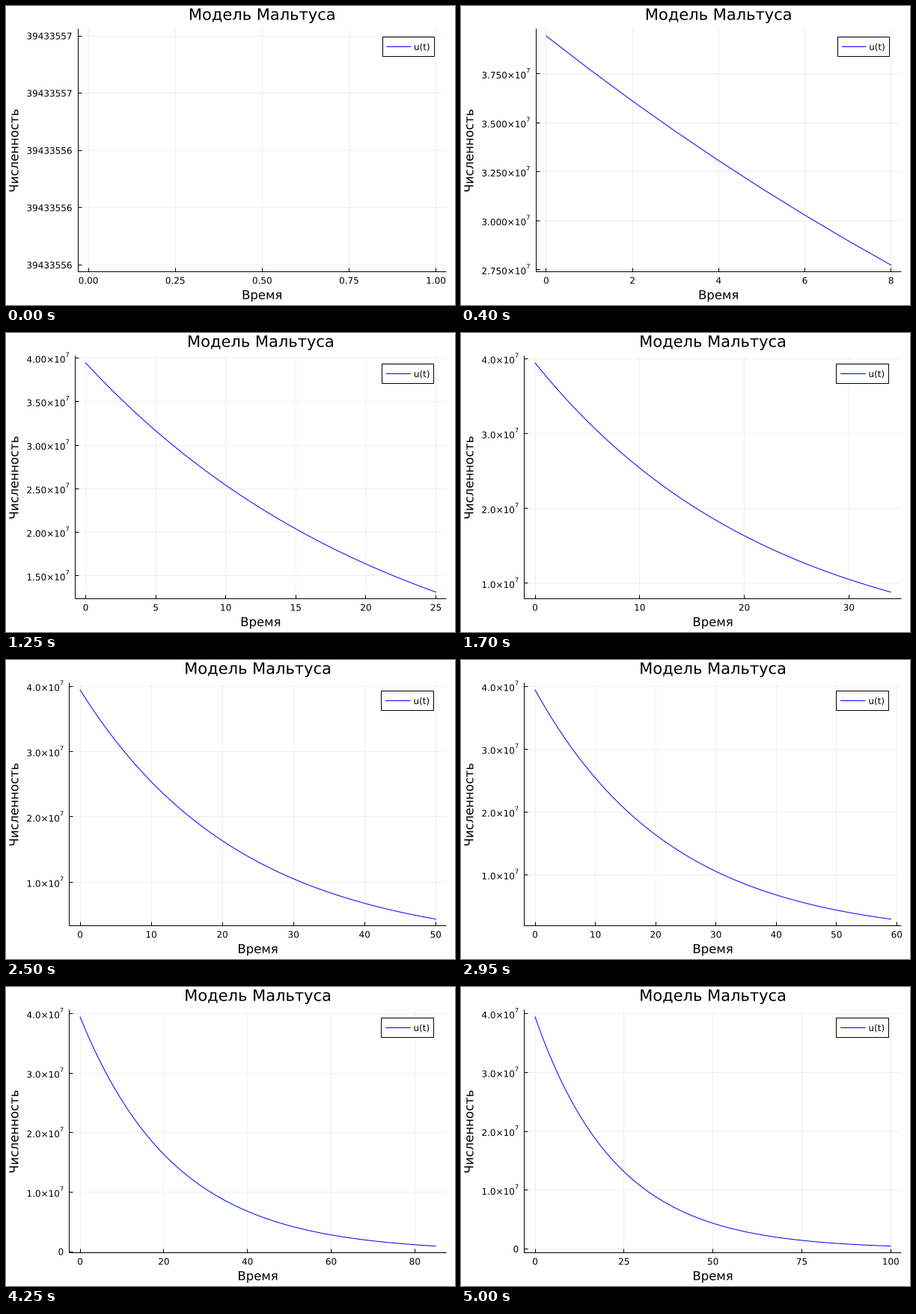
A matplotlib script for the animation above (5.05 s loop, 600 by 400 pixels).

```python
import math

import matplotlib.pyplot as plt
import numpy as np
from matplotlib.animation import FuncAnimation
from matplotlib.collections import LineCollection
from matplotlib.patches import PathPatch, Rectangle
from matplotlib.path import Path
from matplotlib.textpath import TextPath

plt.rcParams["font.family"] = "DejaVu Sans"

W, H, DPI = 600, 400, 100
PX = 72 / DPI
TOP, BOTTOM, RIGHT = 30.9, 355.8, 588.5
PAD = 0.03
N0, RATE, STEPS = 39433556, 0.044, 101
SMALL, SUP, LABEL, TITLE = 12, 8.4, 16.5, 21

# step mantissas and how nice they are
NICE = [(1, 1.0), (5, 0.9), (2, 0.7), (2.5, 0.5), (3, 0.2)]
K_MIN, K_MAX, K_IDEAL = 4, 8, 5


def find_ticks(lo, hi):
    """Score all round step sizes and return the best tick values."""
    span = hi - lo
    z = math.ceil(math.log10(span))
    best, ticks = -math.inf, []
    while 2 * K_MAX * 10.0 ** (z + 1) > span:
        for k in range(K_MIN, 2 * K_MAX + 1):
            for q, nice in NICE:
                step = q * 10.0 ** z
                first, last = math.ceil(lo / step), math.floor(hi / step)
                start, stop = last_start(hi, step, k), math.floor(lo / step)
                n = last - first + 1
                if not K_MIN <= n <= K_MAX or start > stop:
                    continue
                has_zero = start <= 0 and stop > -k
                score = (1 - abs(n - K_IDEAL) / K_IDEAL) / 4 + has_zero / 6
                score += 0.5 * span / ((n - 1) * step) + nice / 4
                if (k - 1) * step >= 2 * span:
                    score -= 1000
                if score > best + 1e-9:
                    best = score
                    ticks = [round(i * step, 6) for i in range(first, last + 1)]
        z -= 1
    return ticks


def last_start(hi, step, k):
    return math.ceil(hi / step) - k + 1


def decimals(values):
    for d in range(8):
        if all(abs(v - round(v, d)) < 1e-9 for v in values):
            return d
    return 8


def format_ticks(ticks):
    """Return (text, superscript) pairs."""
    if ticks[-1] - ticks[0] > 1e4:
        exps = [math.floor(math.log10(v) + 1e-9) if v else 0 for v in ticks]
        mants = [v / 10 ** e for v, e in zip(ticks, exps)]
        d = decimals(mants) + 1
        return [(f"{m:.{d}f}×10", str(e)) if m else ("0", "")
                for m, e in zip(mants, exps)]
    d = 0 if ticks[-1] > 1e7 else decimals(ticks)
    return [(f"{v:.{d}f}", "") for v in ticks]


def advance(s, size):
    return size * sum({".": 0.318, "×": 0.838}.get(c, 0.636) for c in s)


def padded(lo, hi):
    pad = PAD * (hi - lo)
    return lo - pad, hi + pad


def mid(v):
    return math.floor(v) + 0.5


outlines = {}


def text(x, y, s, size, centre=False, upright=False):
    """Outline of a string as (vertices, codes) in stage pixels."""
    if (s, size) not in outlines:
        path = TextPath((0, 0), s, size=size)
        outlines[s, size] = path.vertices, path.codes
    verts, codes = outlines[s, size]
    u, v = verts[:, 0], verts[:, 1]
    if centre:
        ink = u[codes != Path.CLOSEPOLY]
        u = u - (ink.min() + ink.max()) / 2
    if upright:
        return np.column_stack([x - v, y - u]), codes
    return np.column_stack([x + u, y - v]), codes


fig = plt.figure(figsize=(W / DPI, H / DPI), dpi=DPI, facecolor="white")
ax = fig.add_axes([0, 0, 1, 1])
ax.set_xlim(0, W)
ax.set_ylim(H, 0)
ax.axis("off")

grid = LineCollection([], colors="#efefef", linewidths=PX, zorder=1)
frame = LineCollection([], colors="black", linewidths=PX, zorder=2)
for lines in (grid, frame):
    lines.set_snap(False)
    ax.add_collection(lines, autolim=False)
curve, = ax.plot([], [], color="blue", lw=PX, zorder=3)
box = ax.add_patch(Rectangle((0, 41.5), 1, 26, fc="white", ec="black",
                             lw=PX, snap=False, zorder=4))
key, = ax.plot([], [], color="blue", lw=PX, snap=False,
               solid_capstyle="butt", zorder=5)
words = ax.add_patch(PathPatch(Path([(0, 0)]), fc="black", lw=0,
                               snap=False, zorder=6))
ax.set_xlim(0, W)
ax.set_ylim(H, 0)


def place_legend(left):
    """Set the legend box and line, return its text."""
    width = RIGHT - left
    f = width / 45
    right = RIGHT - width / 30
    x = right - 21.67 - f * 13 / 3
    box.set_x(mid(x))
    box.set_width(mid(right) - mid(x))
    key.set_data([x + f / 2, x + 3.5 * f], [54.5, 54.5])
    return text(x + f * 23 / 6, 58.9, "u(t)", SMALL)


def draw(n):
    t = np.arange(n + 1)
    u = N0 * np.exp(-RATE * t)
    xlim = padded(0, max(n, 1))
    ylim = padded(u[-1], u[0]) if n else padded(N0, N0 + 1)
    xt, yt = find_ticks(*xlim), find_ticks(*ylim)

    ylabels = format_ticks(yt)
    widths = [advance(s, SMALL) + advance(e, SUP) for s, e in ylabels]
    left = 35.05 + max(widths)
    ax_x, ax_y = mid(left), mid(BOTTOM)

    def sx(v):
        return left + (v - xlim[0]) / (xlim[1] - xlim[0]) * (RIGHT - left)

    def sy(v):
        return BOTTOM - (v - ylim[0]) / (ylim[1] - ylim[0]) * (BOTTOM - TOP)

    rules = []
    edges = [[(ax_x, TOP - 0.5), (ax_x, ax_y + 0.5)], [(ax_x, ax_y), (RIGHT, ax_y)]]
    centre = (left + RIGHT) / 2
    parts = [
        place_legend(left),
        text(centre, 18.6, "Модель Мальтуса", TITLE, centre=True),
        text(centre, 392.2, "Время", LABEL, centre=True),
        text(16.4, (TOP + BOTTOM) / 2, "Численность", LABEL, centre=True, upright=True),
    ]

    for v, (s, _) in zip(xt, format_ticks(xt)):
        x = mid(sx(v))
        rules.append([(x, TOP), (x, BOTTOM)])
        edges.append([(x, ax_y), (x, ax_y - 5)])
        parts.append(text(sx(v) - advance(s, SMALL) / 2, 371.5, s, SMALL))

    for v, (s, e), w in zip(yt, ylabels, widths):
        y = mid(sy(v))
        rules.append([(left, y), (RIGHT, y)])
        edges.append([(ax_x, y), (ax_x + 5, y)])
        x = left - 7.6 - w
        base = sy(v) + (6.1 if e else 4.4)
        parts.append(text(x, base, s, SMALL))
        if e:
            parts.append(text(x + advance(s, SMALL), base - 7.7, e, SUP))

    grid.set_segments(rules)
    frame.set_segments(edges)
    curve.set_data((sx(t), sy(u)) if n else ([], []))
    verts, codes = zip(*parts)
    words.set_path(Path(np.concatenate(verts), np.concatenate(codes)))
    return grid, frame, curve, box, key, words


anim = FuncAnimation(fig, draw, frames=STEPS, interval=50,
                     init_func=lambda: draw(0), repeat=True, repeat_delay=0)
plt.show()
```
